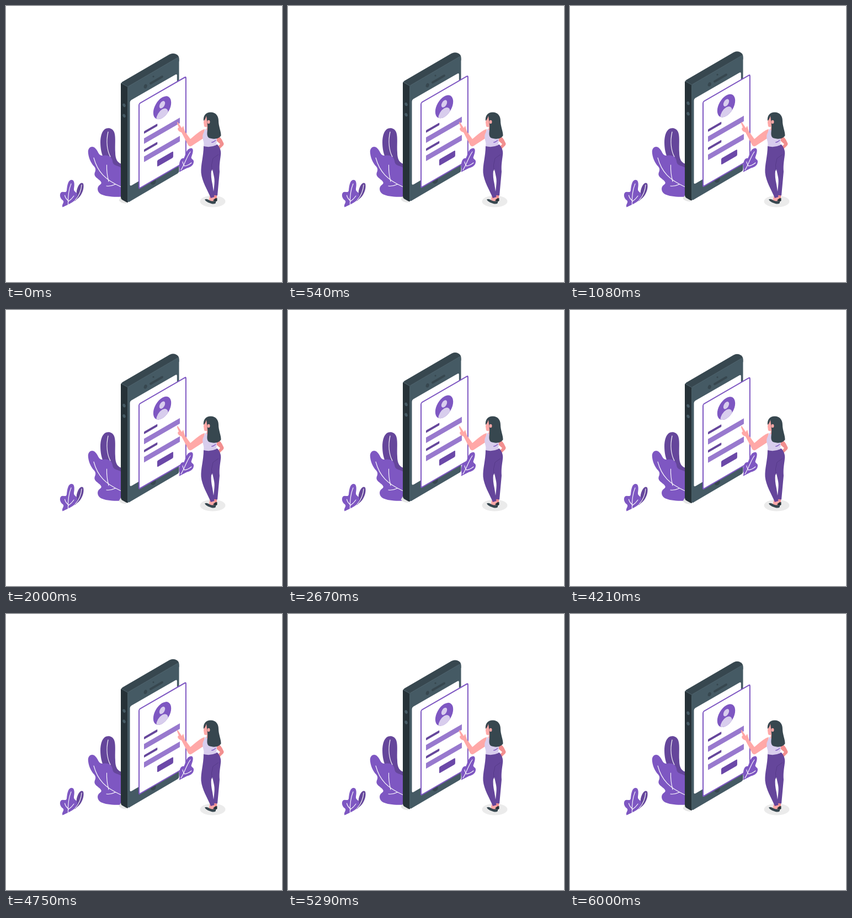
An HTML page for the animation above (6.04 s loop, 500 by 500 pixels).

```html
<!DOCTYPE html>
<html lang="en">
<head>
<meta charset="utf-8">
<title>Sign-up form</title>
<style>
html, body { margin: 0; width: 100%; height: 100%; overflow: hidden; background: #fff }
svg { display: block; width: 100vw; height: 100vh }
.main { fill: #7e57c2 }
.deep { fill: #65469b }
.pale { fill: #d8cded }
.field { fill: #9879ce }
.ink { fill: #263238 }
.slate { fill: #37474f }
.skin { fill: #ffa8a7 }
.blush { fill: #f28f8f }
.vein { fill: none; stroke: #fff; stroke-width: 1.1; stroke-linecap: round }
</style>
</head>
<body>
<svg viewBox="0 0 500 500">
  <defs>
    <clipPath id="avatar"><circle cx="48.500" cy="30.200" r="18.700"/></clipPath>
  </defs>

  <!-- big plant -->
  <path class="deep" d="M209 294V286C202 284 198 277 198 266C197 252 199 239 196.500 230C194 222 187 220 181 222C174 225 171 236 171 247C171 258 173 268 177 276L196 302Z"/>
  <path class="main" d="M148.700 264C149 254 158 253 162 258C168 264 167 271 175 271C185 269 192 273 193 281C194 290 201 288 209 293V345.500C195 346.500 180 345 172 341C165 337 164 328 170 324C178 319 166 314 162 309C157 302 166 299 160 291C153 284 149 273 148.700 264Z"/>
  <path class="vein" d="M159 275C166 301 180 315 209 328M182.500 288Q182 303 186 318M182 326Q190 327 198 323M185 228C181 245 183 262 189 273"/>

  <!-- small left plant -->
  <path class="deep" d="M124 354C130 346 126 339 129 331C132 322 137 318 140 322C142 328 139 340 132 347Z"/>
  <path class="main" d="M102.500 364.500C100 359 107 356 103 352C98 349 96 341 100 337.500C104 335 109 340 110 334C111 323 113 315 119 315C125 315.500 124 325 123 331C122 338 131 337 129 344C127 352 120 356 114 359Z"/>
  <path class="vein" d="M112.500 360C112 347 113 334 118 322M106.500 343Q108 349 113 353M123 344Q119 350 113 354M137 324C136 336 132 344 126 351"/>

  <g id="phone">
    <path fill="#e6e6e6" d="M204.500 352L208 346L222 354L217 357.500Q208 357 204.500 352Z"/>
    <path class="slate" d="M208 142Q208 139 211 137L296 87.500Q303 83.500 310 88Q313.500 90.500 313.500 95V100L222 155Z"/>
    <path class="ink" d="M208 140L221 147V355.500Q219 356 217 354.500L210 350.500Q208 349 208 346Z"/>
    <path fill="#455a64" d="M220.500 149Q220.500 146 223 144.500L308 95Q313.500 91 313.500 97V298.500Q313.500 301.500 311 303L225 353.500Q220.500 357 220.500 351Z"/>
    <path fill="none" stroke="#607780" stroke-width=".5" d="M208.500 139L220.500 146L313 92M220.500 146V354"/>
    <path fill="#fff" d="M224.500 174.500Q224.500 171.500 227 170L307 124Q309.800 122.500 309.800 125.500V273.500Q309.800 276.500 307 278L228 324.500Q224.500 326.500 224.500 323.500Z"/>
    <g fill="#455a64">
      <ellipse cx="214" cy="179.500" rx="2.500" ry="3.400" transform="rotate(-25 214 179.500)"/>
      <ellipse cx="214" cy="198.500" rx="2.500" ry="3.400" transform="rotate(-25 214 198.500)"/>
    </g>
    <path fill="none" stroke="#37474f" stroke-width="4" stroke-linecap="round" d="M262 140L283 127.800"/>
    <g class="slate">
      <ellipse cx="252.700" cy="145.200" rx="2.900" ry="3.900" transform="rotate(20 252.700 145.200)"/>
      <circle cx="267" cy="127.500" r="1.500"/>
      <ellipse cx="266.500" cy="317.500" rx="5" ry="6" transform="rotate(25 266.500 317.500)"/>
    </g>

    <g transform="matrix(.866 -.5 0 1 241 178)">
      <rect y="-1.200" width="98" height="153.700" rx="2.800" fill="#fff" stroke="#7e57c2" stroke-width="2.300"/>
      <circle class="main" cx="48.500" cy="30.200" r="18.700"/>
      <g class="pale" clip-path="url(#avatar)">
        <circle cx="48.500" cy="24.800" r="6"/>
        <circle cx="48.500" cy="45.500" r="12.500"/>
      </g>
      <rect class="deep" x="10.400" y="54" width="28" height="4.500" rx="1"/>
      <rect class="field" x="10.400" y="66.700" width="75" height="10"/>
      <rect class="deep" x="10.400" y="87" width="28" height="4.500" rx="1"/>
      <rect class="field" x="10.400" y="99.700" width="75" height="10"/>
      <rect fill="#6b48a8" x="38" y="120.500" width="33.500" height="11.500" rx="2"/>
    </g>
  </g>

  <!-- small right plant -->
  <path class="main" d="M313.500 301C316 295 312.500 291 314 286C315 279 318 275 322 276C326 270 326 258 336 257.500C341 258.500 338 268 336 273C334 278 341 277 340 283C339 290 333 292 327 294Z"/>
  <path class="vein" d="M317 297C323 288 327 274 334 264M320 282Q320.500 287 323 289M336 284Q330 289 323 290"/>

  <!-- woman -->
  <ellipse cx="374.500" cy="354" rx="23" ry="10.500" fill="#ebebeb"/>
  <path class="blush" d="M376 340H382V350H377Z"/>
  <path class="skin" d="M369 345H378L379 354H367Z"/>
  <path class="ink" d="M379 348.500L382.500 348V353L380 354.500L375 352Z"/>
  <path class="slate" d="M360 350.500C365 348 367 352.500 373 353.500L380 353V357Q378 359 374 358.500C369 357 362 355 360 350.500Z"/>
  <path class="blush" d="M382 235C387 236 389 239 391 242L394.500 249Q395 252 391 255L386 260L383 256L388 250L380 243Z"/>
  <path class="deep" d="M358 253L383 251C388 257 390 263 389 270C388 279 386 288 387 300L383 343.500L375.500 342.500C376 332 379 320 377 310L374 296L372 298C371 306 372 314 374 323L377.500 346L371 348C365 333 355 318 353.500 302C352.500 287 358 273 358 253Z"/>
  <path fill="none" stroke="#523785" stroke-width=".7" d="M373 299Q371 288 375 276L385 269"/>
  <path class="skin" d="M360 223C352 225 344 233 334 241L324 227L321 217L318.500 221L311 210Q309 211 311 215L313 220L311 222Q311 227 318 229L330 252Q333 256 337 253L357 240Z"/>
  <path class="pale" d="M361 223L368 221L382 238Q382 243 381 252Q370 257 358 254C360 246 354 239 357 232Z"/>
  <path class="skin" d="M359 203L358 211L359 218Q361 220 364 219L363 225L371 224L372 203L364 198Z"/>
  <path class="slate" d="M358 208C357 200 361 192.500 371 192.500C380 192.500 385 199 385 208C385 218 390 228 389.500 235C385 241.500 375 242 367 238.500C362 234 366 225 365 216L364 207L363 199Q361 206 358 208Z"/>
  <ellipse class="skin" cx="367" cy="210" rx="2.500" ry="3.300"/>
  <path fill="none" stroke="#7e57c2" stroke-width="1.200" d="M372 247Q376 247 380 243"/>
</svg>
<script>
const LOOP = 6040, RISE = 10, REST = .3;
const phone = document.getElementById('phone');

// Steady float: straight up for half the loop, straight back down.
function draw(now) {
  const phase = now % LOOP / LOOP;
  const y = REST - RISE * (1 - Math.abs(1 - 2 * phase));
  phone.setAttribute('transform', `translate(0 ${y.toFixed(3)})`);
}

const start = performance.now();
function tick() {
  draw(performance.now() - start);
  requestAnimationFrame(tick);
}
tick();
</script>
</body>
</html>
```
